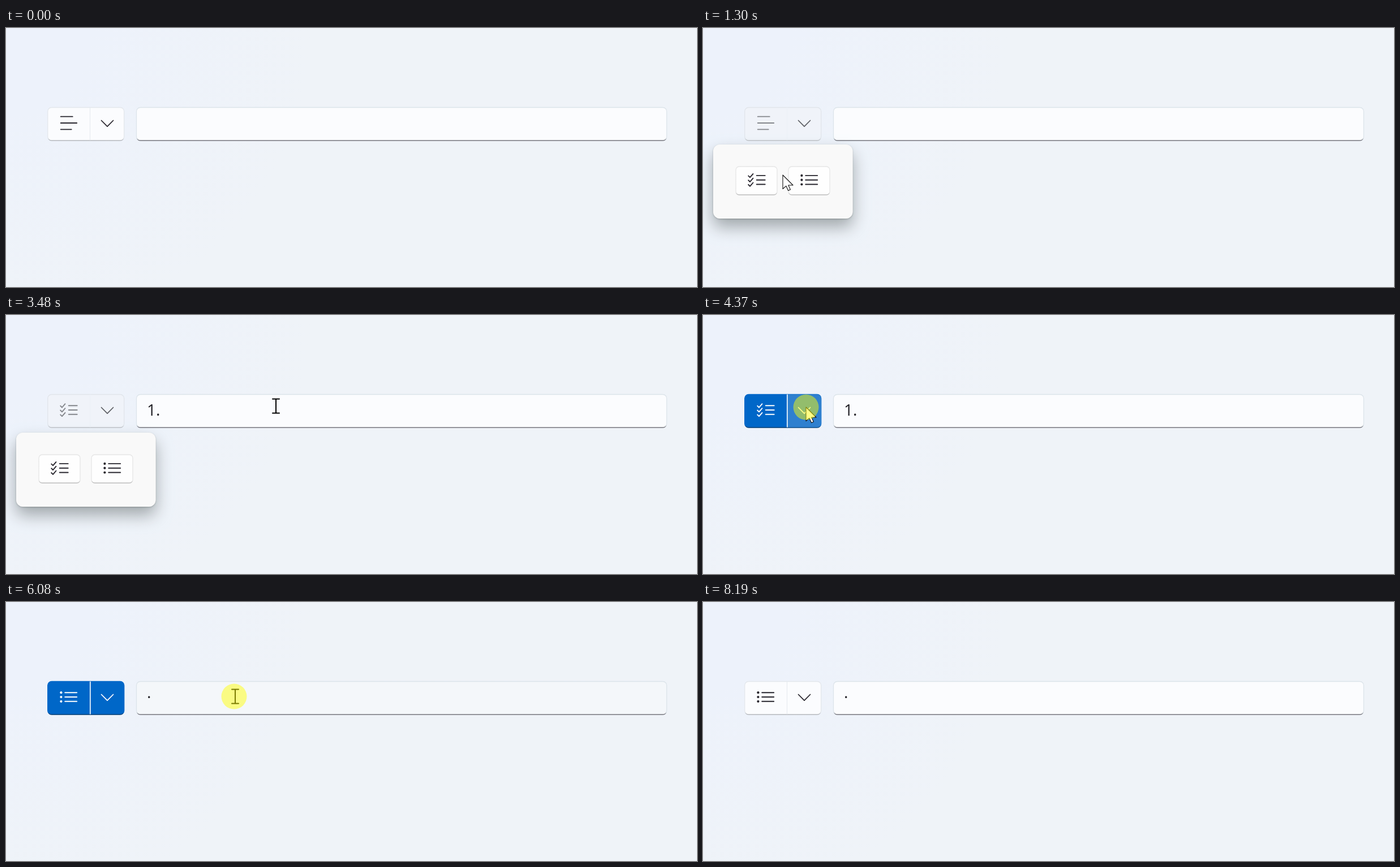
Write an HTML page with a canvas that moves like this. It is 1221 by 458 pixels and loops after 9.12 s.

```html
<!DOCTYPE html>
<html lang="en">
<head>
<meta charset="utf-8">
<title>Split button</title>
<style>
  html, body { margin: 0; width: 100%; height: 100%; overflow: hidden; background: #eff3f8; }
  canvas { display: block; }
</style>
</head>
<body>
<canvas id="stage" width="1221" height="458"></canvas>
<script>
const c = document.getElementById('stage').getContext('2d');
const LOOP = 9120, STEP = 70, HOLD = 130;
const ENTER = 260, LEAVE = 8190;

// Times at which the pointer presses something
const openFirst = 1030, pickChecks = 1860, closeFirst = 3550;
const openSecond = 4310, pickBullets = 5070, closeSecond = 6080, toggleOff = 7160;
const clicks = [openFirst, pickChecks, closeFirst, openSecond, pickBullets, closeSecond, toggleOff];

const start = { x: 1200, y: 66 };
const moves = [
  { from: ENTER, to: 960, x: 176, y: 188 },
  { from: openFirst + HOLD, to: 1300, x: 141, y: 260 },
  { from: 1300, to: 1650, x: 113, y: 278 },
  { from: 2650, to: 3210, x: 477, y: 161 },
  { from: closeFirst + HOLD, to: 4300, x: 182, y: 163 },
  { from: openSecond + HOLD, to: 4860, x: 192, y: 278 },
  { from: pickBullets + HOLD, to: 5540, x: 424, y: 284 },
  { from: 5610, to: 5960, x: 405, y: 167 },
  { from: 6350, to: 6700, x: 116, y: 185 },
  { from: 7490, to: LEAVE, x: 1140, y: 459 }
];

const rows = [-1, 0, 1];
const ink = '#26242c';

const background = c.createRadialGradient(0, 0, 150, 0, 0, 540);
background.addColorStop(0, '#edf2fb');
background.addColorStop(1, '#eff3f8');

const ease = u => u * u * (3 - 2 * u);

function pointerAt(t) {
  let { x, y } = start;
  for (const m of moves) {
    if (t < m.from) break;
    const elapsed = Math.floor((t - m.from) / STEP) * STEP;
    const e = t >= m.to ? 1 : ease(elapsed / (m.to - m.from));
    x += (m.x - x) * e;
    y += (m.y - y) * e;
  }
  return { x, y };
}

function stroke(shape, color, width) {
  c.strokeStyle = color;
  c.lineWidth = width;
  c.lineCap = c.lineJoin = 'round';
  c.stroke(new Path2D(shape));
}

function dot(x, y, r, color) {
  c.beginPath();
  c.arc(x, y, r, 0, 2 * Math.PI);
  c.fillStyle = color;
  c.fill();
}

function fillBox(x, y, w, h, r, fill) {
  c.beginPath();
  c.roundRect(x, y, w, h, r);
  c.fillStyle = fill;
  c.fill();
}

// Rounded box whose border is darker along the bottom
function box(x, y, w, h, r, fill, edge, bottom) {
  fillBox(x, y, w, h, r, fill);
  const g = c.createLinearGradient(0, y, 0, y + h);
  g.addColorStop(0, edge);
  g.addColorStop(1 - 4 / h, edge);
  g.addColorStop(1 - 0.5 / h, bottom);
  c.strokeStyle = g;
  c.lineWidth = 1.3;
  c.stroke();
}

const marks = {
  lines: (row, y, color) => stroke(`M-14 ${y * 1.45}H${row ? 6 - row : 14.5}`, color, 1.8),
  checks(row, y, color) {
    stroke(`M0 ${y}H15`, color, 1.9);
    stroke(`M-14.5 ${y + .5}l2.8 2.8l5.5 -6.3`, color, 1.9);
  },
  bullets(row, y, color) {
    stroke(`M-6.5 ${y}H14.5`, color, 1.9);
    dot(-13.3, y, 2.1, color);
  }
};

function icon(name, x, y, color) {
  c.save();
  c.translate(x, y);
  for (const row of rows) marks[name](row, row * 7.8, color);
  c.restore();
}

function splitButton(name, on, open, hover) {
  const [fill, edge, bottom, divider] = open ? ['#f0f3f9', '#e1e5eb', '#bfc2c7', '#ecf0f6']
    : on ? ['#0067c8', '#0067c8', '#003a70', '#ffffff']
    : ['#fbfcfe', '#e3e7ec', '#b4b7bc', '#e6e9ee'];
  const hoverFill = on ? '#2f80cf' : '#f6f8fb';
  box(73.7, 140.5, 135, 58.5, 7, fill, edge, bottom);
  if (!open && hover === 'main') fillBox(73.7, 140.5, 74.8, 58, [7, 0, 0, 7], hoverFill);
  if (!open && hover === 'arrow') fillBox(148.5, 140.5, 60.5, 58, [0, 7, 7, 0], hoverFill);
  c.fillStyle = divider;
  c.fillRect(148, 140.5, on && !open ? 1.6 : 1, 58);
  const color = on ? '#fff' : ink;
  icon(name, 110.7, 168, open ? '#83868b' : color);
  stroke('M168.5 163.5L179 174.2L189.5 163.5', open ? '#5d5f64' : color, 1.7);
}

function shadow(alpha, blur, offset) {
  c.shadowColor = `rgba(0,8,6,${alpha})`;
  c.shadowBlur = blur;
  c.shadowOffsetY = offset;
}

function flyout(age, pointer, down) {
  const frame = Math.floor(age / STEP);
  const top = 208 - Math.floor(14 / 7 ** frame);
  c.save();
  c.globalAlpha = frame ? 1 : .6;
  shadow(.32, 29, 15);
  fillBox(18, top, 246.5, 131, 12, '#f9f9f9');
  shadow(.22, 3, 1);
  fillBox(18, top, 246.5, 131, 12, '#f9f9f9');
  shadow(0, 0, 0);
  ['checks', 'bullets'].forEach((name, i) => {
    const x = 58 + 93 * i, y = top + 39;
    const over = pointer.x > x && pointer.x < x + 73 && pointer.y > y && pointer.y < y + 50;
    box(x, y, 73, 50, 6, over ? '#f8f8f8' : '#fefefe', '#e6e6e6', '#bcbcbc');
    icon(name, x + 36.7, y + 23.7, over && down ? '#6a6a6a' : ink);
  });
  c.restore();
}

function drawPointer({ x, y }, beam) {
  c.save();
  c.translate(x, y);
  if (beam) {
    stroke('M-6 -12.5H6M0 -12.5V12.5M-6 12.5H6', '#000', 2);
  } else {
    const arrow = 'M0 0V24.5L5.8 19.3L9.6 27.6L13.4 25.8L9.8 18H18Z';
    c.fillStyle = '#fff';
    c.fill(new Path2D(arrow));
    stroke(arrow, '#111', 1.1);
  }
  c.restore();
}

function draw(t) {
  const pointer = pointerAt(t);
  const { x, y } = pointer;
  const visible = t >= ENTER && t < LEAVE;
  const down = clicks.some(at => t >= at && t < at + HOLD);
  const opened = (t < openSecond ? openFirst : openSecond) + HOLD;
  const open = t >= opened && t < (t < openSecond ? closeFirst : closeSecond);
  const checked = t >= pickChecks + HOLD, bulleted = t >= pickBullets + HOLD;
  const on = checked && t < toggleOff + HOLD;
  const inRow = visible && y > 140 && y < 199;
  const inField = inRow && x > 230 && x < 1167;
  const hover = inRow && (x > 73 && x < 148 ? 'main' : x >= 148 && x < 209 ? 'arrow' : '');

  c.fillStyle = background;
  c.fillRect(0, 0, 1221, 458);

  splitButton(bulleted ? 'bullets' : checked ? 'checks' : 'lines', on, open, hover);
  box(230.5, 140.5, 937, 58.5, 7, inField && !open ? '#f4f7fa' : '#fbfcfe', '#dce4ea', '#74747c');

  c.font = '28px "Open Sans", sans-serif';
  c.fillStyle = '#1f1e24';
  if (checked) c.fillText(bulleted ? '·' : '1.', 249, 178);

  if (open && t >= opened + STEP) flyout(t - opened - STEP, pointer, down);
  if (visible) drawPointer(pointer, inField);
  if (down) dot(x - (inField ? 2 : 0), y, 22.5, 'rgba(255,255,0,.48)');
}

function tick() {
  draw(performance.now() % LOOP);
  requestAnimationFrame(tick);
}
tick();
</script>
</body>
</html>
```
